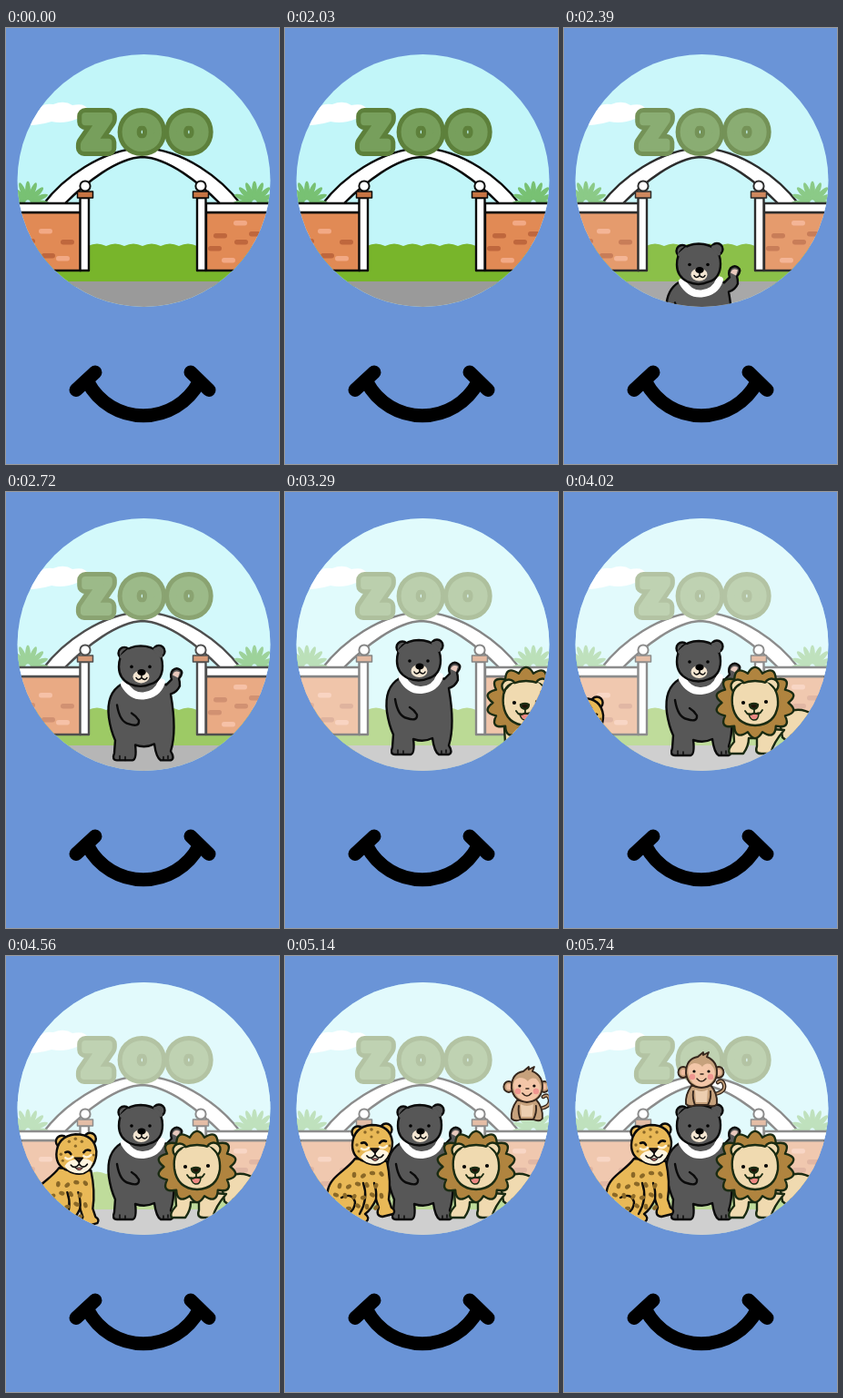
Recreate the animation shown at these times as an HTML page. Size 300 px wide and 480 px high, loop 6.61 s.

```html
<!DOCTYPE html>
<html lang="en">
<head>
<meta charset="utf-8">
<title>Zoo</title>
<style>
  html, body { margin: 0; width: 100%; height: 100%; overflow: hidden; background: #6a94d7; }
  svg { display: block; width: 100%; height: 100%; }
  .sign { font: 900 47px Lato, "Open Sans", sans-serif; text-anchor: middle; stroke-linejoin: round; }
  .rim { fill: #5d803b; stroke: #5d803b; stroke-width: 18; }
  .core { fill: #779f5c; stroke: #779f5c; stroke-width: 8; }
  .ink { stroke: #0b0b0b; stroke-width: 2.4; stroke-linejoin: round; stroke-linecap: round; }
  .line { fill: none; }
  .dots { fill: #000; stroke: none; }
</style>
</head>
<body>
<svg viewBox="0 0 300 480">
  <defs>
    <clipPath id="porthole"><circle cx="151.5" cy="168" r="139"/></clipPath>
    <g id="bush" fill="#78c173"></g>
    <g id="post" class="ink">
      <path d="M81.5 187H91V267H81.5Z" fill="#fff"/>
      <path d="M78.5 180H95.5V187H78.5Z" fill="#c67443" stroke-width="1.5"/>
      <circle cx="87" cy="174" r="5.6" fill="#fff" stroke-width="2"/>
    </g>
  </defs>
  <rect width="300" height="480" fill="#6a94d7"/>

  <g clip-path="url(#porthole)">
    <rect x="12" y="28" width="280" height="280" fill="#c2f6f9"/>
    <path d="M8 108Q24 104 30 98Q24 90 36 91Q38 82 52 84Q64 79 73 85Q87 82 90 90Q103 90 99 97Q92 103 78 100Q64 106 50 103Q35 108 8 108Z" fill="#fff"/>
    <path id="grass" fill="#78b52b"/>
    <rect x="10" y="279" width="284" height="30" fill="#9a9a9a"/>
    <path class="ink" fill="#fff" d="M41 194C62 166 104 134 150 132C196 134 237 166 258 194H236C212 170 178 143 150 142C122 143 88 170 64 194Z"/>
    <use href="#bush" x="24" y="192"/>
    <use href="#bush" x="273" y="192"/>
    <g class="ink" fill="#e18a55">
      <path d="M5 203H82V267H5ZM220 203H296V267H220Z"/>
      <path d="M5 193H82V203H5ZM220 193H296V203H220Z" fill="#fff"/>
    </g>
    <g id="bricks"></g>
    <use href="#post"/>
    <use href="#post" transform="translate(301 0) scale(-1 1)"/>
    <g id="sign" class="sign"></g>
    <rect id="veil" x="10" y="26" width="284" height="284" fill="#fff" opacity="0"/>

    <g id="bear" class="ink" fill="#575757">
      <path d="M127 206C115 213 111 227 113 243Q115 257 120 268L119 282Q116 290 122 290H139Q144 289 142 273Q153 277 163 272Q165 287 170 290H181Q186 288 181 280C186 264 185 240 181 217Q188 215 191 208Q191 203 190 200Q196 193 191 190Q187 187 183 191Q180 195 182 201L176 207Q170 202 164 203Z"/>
      <path d="M130 206Q138 220 151 219Q166 218 171 204" class="line" stroke="#fff" stroke-width="8"/>
      <path d="M122 229Q125 248 135 250Q147 254 146 246Q143 241 138 238" class="line"/>
      <path d="M183 196Q185 190 191 193L189 199Z" fill="#e9c9bd" stroke="none"/>
      <circle cx="130" cy="172" r="6.5"/><circle cx="168" cy="170" r="6.5"/>
      <path d="M124 187Q124 165 148 164Q172 165 172 186Q172 202 159 206Q148 211 136 206Q124 200 124 187Z"/>
      <path d="M127 176L134 170M164 168L170 175" stroke="#575757" stroke-width="4"/>
      <ellipse cx="148.5" cy="198" rx="9" ry="7" fill="#f3e5d1" stroke="none"/>
      <ellipse cx="149" cy="193" rx="4.7" ry="3.5" class="dots"/>
      <path d="M149 196V199Q145 203 143 199M149 199Q153 203 155 199" class="line" stroke-width="1.5"/>
      <g class="dots"><circle cx="138" cy="187" r="1.8"/><circle cx="158" cy="187" r="1.8"/></g>
      <path d="M125 285V289M131 286V290M173 286V289M178 285V288" stroke-width="1.5"/>
    </g>

    <g id="leopard" class="ink" fill="#e9b957">
      <path d="M77 223C68 236 50 242 47 258C45 270 52 276 58 281L71 293H89Q94 288 88 284Q95 279 100 268L103 277Q99 286 107 287L119 284Q122 280 117 277L114 268C116 255 115 240 112 226Z"/>
      <path d="M86 250Q92 267 82 284M62 266Q74 260 77 271Q77 279 69 284M100 268Q101 259 98 250" class="line"/>
      <g id="spots" fill="#8a6827" stroke="none"></g>
      <circle cx="80" cy="194" r="6.5"/><circle cx="111" cy="191" r="6.5"/>
      <path d="M74 208Q75 188 95 186Q116 186 118 205Q118 222 104 229Q95 231 87 226Q74 222 74 208Z"/>
      <path d="M83 221Q88 213 98 214Q108 211 114 217Q110 229 99 229Q88 229 83 221Z" fill="#fff4df" stroke="none"/>
      <path d="M84 212Q88 215 92 211M104 210Q108 213 112 209" class="line" stroke="#fff2d6" stroke-width="2.5"/>
      <path d="M84 206Q88 204 90 208M104 206Q107 202 111 204" class="line" stroke-width="2.6"/>
      <path d="M94 212H103L99 217Z" fill="#2b1813" stroke-width="1.5"/>
      <path d="M99 217V219Q94 225 90 220M99 219Q104 225 108 219" class="line" stroke-width="1.7"/>
      <path d="M95 223H103Q99 228 95 223Z" fill="#ed8582" stroke-width="1"/>
      <g fill="#8a6827" stroke="none"><circle cx="88" cy="194" r="1.7"/><circle cx="95" cy="191" r="1.8"/><circle cx="102" cy="194" r="1.7"/><circle cx="95" cy="199" r="1.6"/><circle cx="79" cy="208" r="1.7"/><circle cx="81" cy="215" r="1.5"/><circle cx="115" cy="209" r="1.4"/></g>
    </g>

    <g id="lion" class="ink" fill="#f0dab0" style="stroke:#1a2b12">
      <path d="M236 246Q258 234 273 245Q288 258 285 288H262Q256 279 247 276L240 270Z"/>
      <path d="M186 258L187 275Q179 284 182 288H197Q203 280 203 271H212V280Q209 288 217 288H227Q230 276 242 262Z"/>
      <path id="mane" fill="#b0843f"/>
      <circle cx="191" cy="214" r="7.5"/><circle cx="228" cy="213" r="7.5"/>
      <path d="M185 234Q183 215 195 211Q210 205 225 211Q236 217 235 235Q232 256 210 257Q188 256 185 234Z"/>
      <path d="M190 220L196 213M223 212L229 219" stroke="#f0dab0" stroke-width="4"/>
      <g class="dots"><circle cx="197" cy="232" r="2.1"/><circle cx="222" cy="231" r="2.1"/></g>
      <path d="M204 234Q209 232 213 234Q213 238 209 239Q204 238 204 234Z" fill="#221108"/>
      <path d="M203 244Q208 245 214 243Q214 252 208 251Q204 250 203 244Z" fill="#ed8983" stroke-width="1.5"/>
      <path d="M209 239V243Q203 248 199 241M209 243Q214 247 218 240" class="line" stroke-width="1.8"/>
    </g>

    <g id="monkey" class="ink" fill="#c6a17c" style="stroke:#35261c;stroke-width:1.9">
      <path d="M160 153Q178 151 176 142Q174 135 169 139" class="line" stroke-width="4.5"/>
      <path d="M160 153Q178 151 176 142Q174 135 169 139" class="line" stroke="#c6a17c" stroke-width="1.8"/>
      <path d="M140 143Q133 153 134 163Q138 167 144 164H158Q165 167 168 163Q169 151 161 142Z"/>
      <path d="M144 147Q151 151 158 147L157 161H145Z" fill="#ecceb0" stroke="none"/>
      <path d="M142 149Q141 157 144 164M161 149Q162 157 158 164" class="line"/>
      <ellipse cx="131" cy="128" rx="5.5" ry="6"/><ellipse cx="170" cy="128" rx="5.5" ry="6"/>
      <g fill="#efbda0" stroke="none"><ellipse cx="131" cy="128" rx="2.6" ry="3.2"/><ellipse cx="170" cy="128" rx="2.6" ry="3.2"/></g>
      <path d="M134 129Q134 113 147 111L153 106L153 109L159 106L157 111Q169 116 168 130Q166 144 151 145Q136 144 134 129Z"/>
      <path d="M137 131Q134 120 143 118Q149 118 152 122Q155 117 161 119Q168 126 165 134Q161 143.500 151 143.500Q140 143 137 131Z" fill="#f3c6a8" stroke="none"/>
      <g class="dots"><circle cx="143" cy="127" r="1.6"/><circle cx="159" cy="127" r="1.6"/></g>
      <path d="M150 130H153M146 135Q151 141 156 135" class="line" stroke-width="1.5"/>
      <g fill="#ef9690" stroke="none"><circle cx="141" cy="133" r="3.2"/><circle cx="161" cy="133" r="3.2"/></g>
    </g>
  </g>

  <g fill="none" stroke="#000" stroke-width="15" stroke-linecap="round">
    <path d="M90 390A69 69 0 0 0 212 390"/>
    <path d="M77 398.500L98 379M203 379L223 398.500"/>
  </g>
</svg>

<script>
const LOOP = 6610;
const $ = id => document.getElementById(id);
const fill = (id, count, shape) => {
  $(id).innerHTML = Array.from({ length: count }, (_, i) => shape(i)).join('');
};

// Scenery and textures built from simple rules
fill('sign', 3, i => ['rim', 'core'].map(layer =>
  `<text class="${layer}" x="${[99.5, 149.5, 201][i]}" y="131.5">${'ZOO'[i]}</text>`).join(''));
fill('bush', 9, i => `<ellipse cy="-13" rx="2.9" ry="10.5" transform="rotate(${i * 23 - 92})"/>`);
fill('spots', 24, i => {
  const row = Math.floor(i / 6), x = 56 + (i % 6) * 10 + (row % 2) * 4, y = 239 + row * 12 + (i * 5) % 4;
  const outside = x > 109 || (row === 0 && x < 70);
  return outside ? '' : `<ellipse cx="${x}" cy="${y}" rx="3.2" ry="2.3" transform="rotate(${i * 47} ${x} ${y})"/>`;
});
const brick = (x, y, tone) => `<rect x="${x}" y="${y}" width="15" height="5.5" rx="2.7" fill="${tone}"/>`;
const dark = '#bf673d', pale = '#f2a985';
$('bricks').innerHTML = [
  [36, 221, pale], [60, 233, dark], [39, 248, dark], [55, 251, pale], [17, 232, dark],
  [250, 212, pale], [228, 226, dark], [251, 233, dark], [222, 240, dark], [267, 224, dark], [237, 253, pale]
].map(args => brick(...args)).join('');

let grass = 'M10 285V240';
for (let x = 10; x < 290; x += 20) grass += `q10 ${x % 40 ? -5 : -3} 20 0`;
$('grass').setAttribute('d', grass + 'V285Z');

const lobes = 14;
let mane = '';
for (let i = 0; i <= lobes; i++) {
  const at = (turn, rx, ry) => {
    const a = turn / lobes * 2 * Math.PI;
    return `${(210 + rx * Math.cos(a)).toFixed(1)} ${(232 + ry * Math.sin(a)).toFixed(1)}`;
  };
  mane += i ? `Q${at(i - 0.5, 51, 46)} ${at(i, 36.5, 33)}` : `M${at(0, 36.5, 33)}`;
}
$('mane').setAttribute('d', mane + 'Z');

// Each key: time, x offset, y offset
const tracks = {
  bear: [[2030, 0, 148], [2720, 0, 5.5], [2780, 0, 1], [3290, -1, -1], [3800, 0, 0]],
  lion: [[2690, 118, 0], [3290, 55, 0], [3950, 0, 0]],
  leopard: [[3760, -101, 56], [4020, -75, 41], [4740, 0, 0]],
  monkey: [[4770, 174, 19], [5140, 115, 16], [5425, 73, 12], [5740, 0, 0]]
};

function sample(keys, t) {
  if (t <= keys[0][0]) return keys[0].slice(1);
  const next = keys.findIndex(key => key[0] >= t);
  if (next < 0) return keys[keys.length - 1].slice(1);
  const a = keys[next - 1], b = keys[next], k = (t - a[0]) / (b[0] - a[0]);
  return [a[1] + (b[1] - a[1]) * k, a[2] + (b[2] - a[2]) * k];
}

function draw(t) {
  $('veil').setAttribute('opacity', 0.53 * Math.min(1, Math.max(0, (t - 2030) / 1340)));
  for (const [id, keys] of Object.entries(tracks)) {
    const [x, y] = sample(keys, t);
    $(id).setAttribute('transform', `translate(${x.toFixed(2)} ${y.toFixed(2)})`);
    $(id).setAttribute('visibility', t > keys[0][0] ? 'visible' : 'hidden');
  }
}

const start = performance.now();
function tick() {
  draw((performance.now() - start) % LOOP);
  requestAnimationFrame(tick);
}
tick();
</script>
</body>
</html>
```
